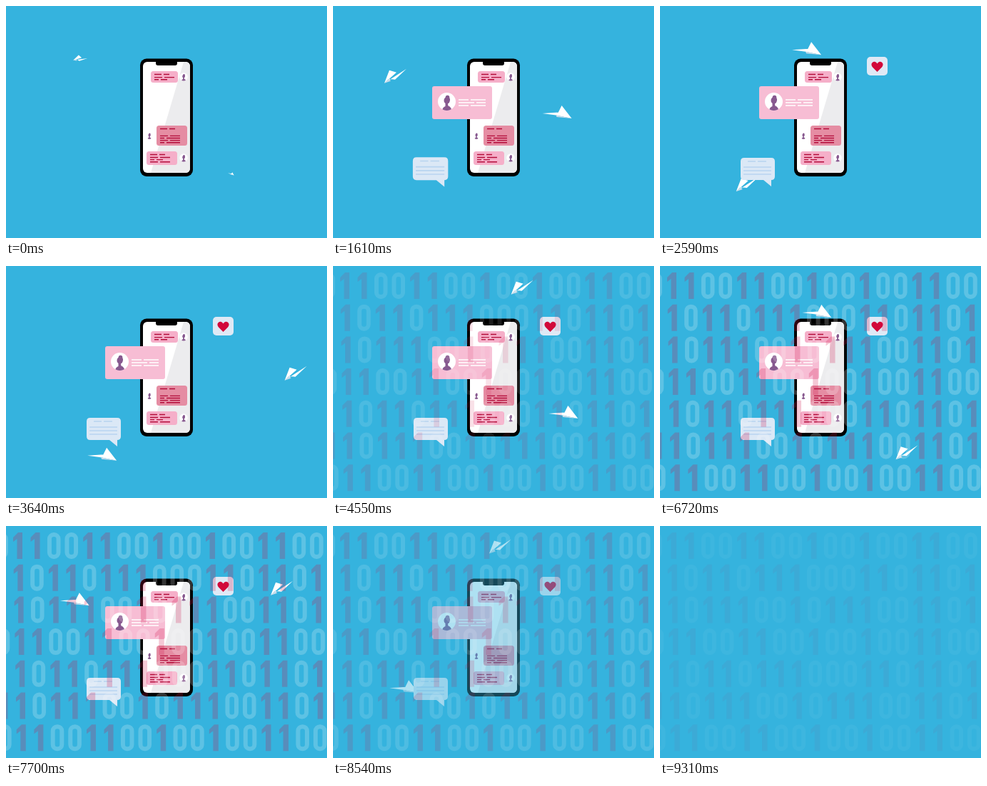
Write an HTML page that moves like this. It is 450x324 px and loops after 9.53 s.

```html
<!DOCTYPE html>
<html lang="en">
<head>
<meta charset="utf-8">
<title>Messages</title>
<style>
html, body { margin: 0; width: 100%; height: 100%; overflow: hidden; background: #35b3de; }
svg { display: block; width: 100%; height: 100%; }
</style>
</head>
<body>
<svg viewBox="0 0 450 324" xmlns="http://www.w3.org/2000/svg">
  <defs>
    <clipPath id="screen"><rect x="192" y="78" width="66" height="155" rx="6"/></clipPath>
    <clipPath id="round"><circle r="12.5"/></clipPath>
    <g id="person" fill="#87598f">
      <circle cx="1" cy="-6" r="2.8"/>
      <path d="M-3.500-4Q-2-7 1-6.500Q5-6 4.500-2Q4 2 1.500 3L2 6Q6 7 7 12.500H-6.500Q-6 8-2 6.500V2.500Q-5 0-3.500-4Z"/>
    </g>
  </defs>
  <rect width="450" height="324" fill="#35b3de"/>
  <g id="scene">
    <g id="dart">
      <path fill="#fff" d="M-21 2L2 0.500L20 9L-2 4.500ZM6-9L20 9L1 1Z"/>
      <path fill="#c9dcea" d="M-2 4.500L-1 7L20 9Z"/>
    </g>
    <g id="glider">
      <path fill="#fff" d="M-15 10L-8-8L2-5ZM-15 10L16-10L0 5L-9 4Z"/>
      <path fill="#c9dcea" d="M-15 10L-9 4L-6 7Z"/>
    </g>
    <rect x="188" y="73.500" width="74" height="164.500" rx="9"/>
    <g clip-path="url(#screen)">
      <rect x="192" y="78" width="66" height="155" fill="#fff"/>
      <path fill="#ececee" d="M249 78H258V233H203Z"/>
    </g>
    <path d="M210 77H240V80Q240 83 237 83H213Q210 83 210 80Z"/>
    <g id="chat"></g>
    <g id="card">
      <rect x="139" y="112" width="84" height="46" rx="3" fill="#f7bdd4"/>
    </g>
    <g id="bubble">
      <path fill="#dbe8f6" d="M118 212H156Q161 212 161 217V238Q161 243 156 243L156 252L145 243H118Q113 243 113 238V217Q113 212 118 212Z"/>
    </g>
    <g id="like">
      <rect x="290" y="71" width="29" height="26" rx="5" fill="#dfe9f5"/>
      <path fill="#d2083a" d="M304.500 92L298 85.500Q295.500 82.500 297 79.800Q298.500 77.500 301 77.800Q303.500 78.200 304.500 80.500Q305.500 78.200 308 77.800Q310.500 77.500 312 79.800Q313.500 82.500 311 85.500Z"/>
    </g>
  </g>
  <g id="bits"></g>
</svg>
<script>
const LOOP = 9530, STEP = 70, LAST = 9310;
const $ = id => document.getElementById(id);
const NS = 'http://www.w3.org/2000/svg';

function add(parent, tag, attrs) {
  const el = document.createElementNS(NS, tag);
  for (const k in attrs) el.setAttribute(k, attrs[k]);
  return parent.appendChild(el);
}

// One line of placeholder text: a word, a gap, then a second word.
function words(parent, x, y, first, total, color, width) {
  const d = `M${x} ${y}h${first}m3 0H${x + total}`;
  add(parent, 'path', { d, stroke: color, 'stroke-width': width, fill: 'none' });
}

function message(x, y, w, h, fill, rows) {
  const g = $('chat'), ink = '#b40d3b';
  add(g, 'rect', { x, y, width: w, height: h, rx: 3.5, fill });
  words(g, x + 5, y + 4.5, 10, 21, ink, 1.5);
  for (let i = 0; i < rows; i++) {
    const odd = i % 2;
    words(g, x + 5, y + h - 4.3 - 3.1 * (rows - 1 - i), odd ? 6 : 11,
      odd && rows < 4 ? 18 : 28, ink, 1.4);
  }
}

function avatar(parent, x, y, size) {
  const g = add(parent, 'g', { transform: `translate(${x} ${y}) scale(${size})` });
  add(g, 'circle', { r: 12.5, fill: '#fff' });
  const face = add(g, 'g', { 'clip-path': 'url(#round)' });
  add(face, 'use', { href: '#person' });
}

message(203, 91, 38, 16, '#f5afc9', 2);
message(211, 167, 43, 28, '#e58da3', 4);
message(197, 203, 43, 19, '#f5afc9', 3);
avatar($('chat'), 249, 99, 0.46);
avatar($('chat'), 201, 181, 0.4);
avatar($('chat'), 249, 212, 0.46);
avatar($('card'), 159.5, 133.5, 1);
words($('bubble'), 123, 217, 11, 26, '#b8d4f0', 1.6);
for (let i = 0; i < 3; i++) {
  words($('card'), 176, 131 + 4 * i, i === 1 ? 22 : 14, 38, '#fff', 1.7);
  add($('bubble'), 'path', { d: `M117 ${225 + 5 * i}h39`, stroke: '#b8d4f0', 'stroke-width': 1.6 });
}

// Binary wallpaper: three patterns, each row drifting slightly to the right.
const patterns = ['0110011001001001100', ' 101101110001101101', '1101110010111001101'];
const ONE = 'M-8 7L-1 0H5V37H-2.5V9L-8 13Z';
for (let row = 0; row < 7; row++) {
  [...patterns[row % 3]].forEach((bit, i) => {
    const x = 18 + row * 0.8 + (i - 1) * 24.55, y = 9 + row * 44.7;
    const g = add($('bits'), 'g', { transform: `translate(${x} ${y})` });
    if (bit === '1') add(g, 'path', { d: ONE, fill: '#d0104a', opacity: 0.23 });
    if (bit === '0') add(g, 'rect', {
      x: -6.2, y: 3, width: 12.6, height: 31, rx: 6, fill: 'none',
      stroke: '#fff', 'stroke-width': 6, opacity: 0.2 });
  });
}

const clamp = v => Math.max(0, Math.min(1, v));
const ramp = (t, a, b) => clamp((t - a) / (b - a));
const mix = (a, b, p) => a + (b - a) * p;
const backOut = p => 1 + 2.2 * (p - 1) ** 3 + 1.2 * (p - 1) ** 2;

// Planes circle the phone on slightly lobed ellipses; keys are [time, degrees].
const dart = {
  x: 202, y: 176, rx: 119, ry: 119, lobes: 2, bulge: 0.08, lead: 140, size: 0.22, turn: 10,
  keys: [[0, -27], [1610, 14], [2590, 88], [4550, 347], [5740, 385], [7700, 505], [LOOP, 640]]
};
const glider = {
  x: 240, y: 160, rx: 164, ry: 137, lobes: 3, bulge: 0.04, lead: 148, size: 0.55, turn: 25,
  keys: [[0, 143], [1610, 154], [2590, 222], [3920, 399], [4550, 441], [5740, 582], [7700, 751], [LOOP, 880]]
};

// Smooth Hermite curve through the keys.
function along(keys, t) {
  const i = Math.max(0, keys.findIndex(k => k[0] > t) - 1);
  const a = keys[i], b = keys[i + 1];
  const before = keys[i - 1] || a, after = keys[i + 2] || b;
  const span = b[0] - a[0], p = (t - a[0]) / span;
  const slope = (u, v) => (v[1] - u[1]) / (v[0] - u[0]) * span;
  const ease = p * p * (3 - 2 * p);
  return mix(a[1], b[1], ease)
    + p * (1 - p) ** 2 * slope(before, b) - p * p * (1 - p) * slope(a, after);
}

function fly(id, o, t) {
  const rad = Math.PI / 180, angle = along(o.keys, t), p = ramp(t, 0, 1500);
  const r = 1 + o.bulge * Math.cos(o.lobes * (angle - o.lead) * rad);
  const x = o.x + o.rx * r * Math.cos(angle * rad);
  const y = o.y - o.ry * r * Math.sin(angle * rad);
  $(id).setAttribute('transform',
    `translate(${x} ${y}) rotate(${mix(o.turn, 0, p)}) scale(${mix(o.size, 1, p)})`);
}

function pop(id, x, y, t, start, end) {
  const s = t < start ? 0 : backOut(ramp(t, start, end));
  $(id).setAttribute('transform', `translate(${x} ${y}) scale(${s}) translate(${-x} ${-y})`);
}

function draw(t) {
  fly('dart', dart, t);
  fly('glider', glider, t);
  pop('card', 190, 135, t, 350, 950);
  pop('bubble', 150, 235, t, 1050, 1750);
  pop('like', 304.5, 84, t, 2000, 2520);
  $('scene').setAttribute('opacity', 1 - ramp(t, 8100, 9200));
  $('bits').setAttribute('opacity', Math.sqrt(ramp(t, 3950, 5900)) * (1 - ramp(t, 7900, 9700)));
}

const begin = performance.now();
function tick() {
  const t = (performance.now() - begin) % LOOP;
  draw(Math.min(LAST, Math.floor(t / STEP) * STEP));
  requestAnimationFrame(tick);
}
tick();
</script>
</body>
</html>
```
